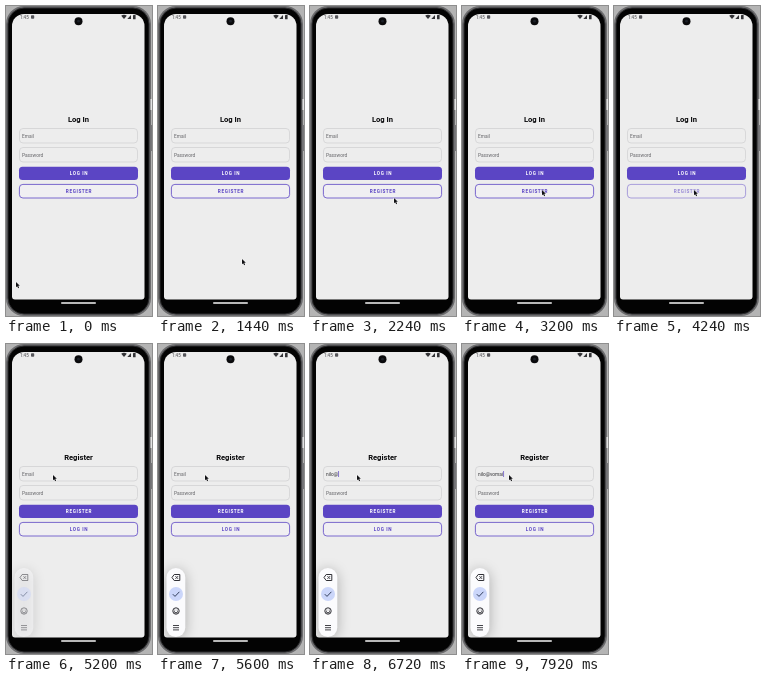
Recreate the animation shown at these times as an HTML page with a canvas. Size 146 px wide and 310 px high, loop 8 s.

```html
<!DOCTYPE html>
<html lang="en">
<head>
<meta charset="utf-8">
<title>Login screen</title>
<style>
html, body { margin: 0; width: 100%; height: 100%; overflow: hidden; background: #000; }
canvas { display: block; width: 146px; height: 310px; }
</style>
</head>
<body>
<canvas id="stage"></canvas>
<script>
const W = 146, H = 310, LOOP = 8000, STEP = 80;
const PURPLE = '#5b45c4', SCREEN = '#ededed', INK = '#111114';
const canvas = document.getElementById('stage');
const ctx = canvas.getContext('2d');
const ratio = window.devicePixelRatio || 1;
canvas.width = W * ratio;
canvas.height = H * ratio;

// Cursor stops: time, x, y
const path = [
  [0, 10, 276], [560, 84, 253], [1440, 84, 253], [1600, 84, 192],
  [2560, 84, 192], [2800, 80, 184], [4240, 80, 184],
  [4560, 53, 138], [4720, 47, 131], [LOOP, 47, 131]
];
const email = 'nilo@vomai';
const keyTimes = [6160, 6240, 6320, 6400, 6640, 6960, 7120, 7280, 7440, 7760];

const clamp = v => Math.max(0, Math.min(1, v));
const ease = v => v * v * (3 - 2 * v);
const ramp = (t, a, b) => ease(clamp((t - a) / (b - a)));

function box(x, y, w, h, r, fill, stroke, line = 1) {
  ctx.beginPath();
  ctx.roundRect(x, y, w, h, r);
  if (fill) { ctx.fillStyle = fill; ctx.fill(); }
  if (stroke) { ctx.strokeStyle = stroke; ctx.lineWidth = line; ctx.stroke(); }
}

function disc(x, y, r, fill) {
  ctx.beginPath();
  ctx.arc(x, y, r, 0, 7);
  ctx.fillStyle = fill;
  ctx.fill();
}

function line(points, color, width = 1, close = false) {
  ctx.beginPath();
  points.forEach(([x, y]) => ctx.lineTo(x, y));
  if (close) ctx.closePath();
  ctx.strokeStyle = color;
  ctx.lineWidth = width;
  ctx.stroke();
}

function text(str, x, y, size, color, weight = 400, align = 'left', spacing = 0) {
  ctx.font = `${weight} ${size}px Roboto, sans-serif`;
  ctx.letterSpacing = spacing + 'px';
  ctx.textAlign = align;
  ctx.fillStyle = color;
  ctx.fillText(str, x, y);
}

function drawPhone() {
  ctx.fillStyle = '#b4b4b4';
  ctx.fillRect(0, 0, W, H);
  box(0, 0, 145, H, 18, '#6c6c6e');
  box(144.5, 93, 1.5, 11, 0, '#e4e4e4');
  box(144.5, 119, 1.5, 26, 0, '#77777a');
  box(2, 2, 141, 306, 16, '#030303', '#2c2c2e', 1);
  box(6, 8, 132.5, 285.5, [12, 12, 3, 3], SCREEN);
  box(55, 296.3, 35, 1.5, 0.75, '#f4f4f4');
  disc(72.5, 15.2, 4, '#0a0a0c');
  disc(72.5, 15.2, 1.4, '#1c2028');
}

function drawStatus() {
  text('1:45', 14, 12.7, 4.5, '#444448');
  box(25, 9.2, 3.2, 3.6, 0.8, '#55555a');
  ctx.fillStyle = '#333336';
  ctx.beginPath();
  ctx.moveTo(118, 13);
  ctx.lineTo(115.2, 9.8);
  ctx.quadraticCurveTo(118, 7.9, 120.8, 9.8);
  ctx.fill();
  ctx.beginPath();
  ctx.moveTo(121.3, 13);
  ctx.lineTo(125, 13);
  ctx.lineTo(125, 9);
  ctx.fill();
  box(127, 9, 2.6, 4.2, 0.5, '#333336');
}

function drawField(y, value, color) {
  box(13.5, y + 0.5, 118, 14.5, 3.5, SCREEN, '#d2d2d4', 0.8);
  text(value, 16, y + 9.5, 4.8, color);
}

function drawForm(t) {
  const registering = t >= 4320;
  const count = keyTimes.filter(k => k <= t).length;
  const typed = email.slice(0, count);
  const names = registering ? ['Register', 'REGISTER', 'LOG IN'] : ['Log In', 'LOG IN', 'REGISTER'];

  text(names[0], 72.5, 116, 7.6, '#08080a', 700, 'center');
  drawField(122, typed || 'Email', typed ? '#303034' : '#626266');
  if (typed) {
    const end = 16 + ctx.measureText(typed).width;
    ctx.fillStyle = PURPLE;
    ctx.fillRect(end + 0.3, 127, 0.7, 6);
  }
  drawField(141, 'Password', '#626266');

  box(13, 160.8, 119, 13.2, 3.5, PURPLE);
  text(names[1], 73, 169.1, 4.7, '#fff', 700, 'center', 0.6);
  ctx.globalAlpha = registering ? 1 : 1 - 0.4 * ramp(t, 3840, 4160);
  box(13.4, 178.4, 118.2, 13.6, 3.5, '#f0eff2', PURPLE, 0.8);
  text(names[2], 73, 186.9, 4.7, PURPLE, 700, 'center', 0.6);
  ctx.globalAlpha = 1;
}

function drawTools(t) {
  const show = ramp(t, 5040, 5360);
  if (!show) return;
  ctx.save();
  ctx.globalAlpha = show;
  ctx.shadowColor = 'rgba(0,0,0,.28)';
  ctx.shadowBlur = 13 * ratio;
  ctx.shadowOffsetY = ratio * 2;
  ctx.save();
  ctx.beginPath();
  ctx.rect(6, 200, 132.5, 93.5);
  ctx.clip();
  box(8.5, 224, 18.8, 69, 9.4, '#fbfbfd');
  ctx.restore();
  ctx.shadowColor = 'transparent';
  disc(18, 250, 7, '#cbd6fa');
  line([[14, 233.5], [16.2, 230.5], [21.8, 230.5], [21.8, 236.5], [16.2, 236.5]], '#303036', 1, true);
  line([[17.3, 232], [20.2, 235]], '#303036', 0.8);
  line([[20.2, 232], [17.3, 235]], '#303036', 0.8);
  line([[14.8, 250.2], [17, 252.4], [21.4, 247.8]], '#34405e', 1);
  ctx.strokeStyle = '#303036';
  ctx.beginPath();
  ctx.arc(18, 267, 3.2, 0, 7);
  ctx.stroke();
  ctx.beginPath();
  ctx.arc(18, 267.3, 1.6, 0, Math.PI);
  ctx.stroke();
  disc(16.8, 266, 0.5, '#303036');
  disc(19.2, 266, 0.5, '#303036');
  for (let i = 0; i < 3; i++) line([[15, 281.5 + i * 2.2], [21, 281.5 + i * 2.2]], '#303036', 0.9);
  ctx.restore();
}

function drawCursor(t) {
  const i = Math.max(1, path.findIndex(p => p[0] > t));
  const [t0, x0, y0] = path[i - 1], [t1, x1, y1] = path[i];
  const k = ramp(t, t0, t1);
  ctx.save();
  ctx.translate(x0 + (x1 - x0) * k, y0 + (y1 - y0) * k);
  ctx.scale(0.88, 0.88);
  ctx.lineJoin = 'round';
  const arrow = [[0, 0], [0, 6], [1.4, 4.8], [2.4, 7], [3.5, 6.5], [2.5, 4.4], [4.4, 4.3]];
  line(arrow, 'rgba(255,255,255,.9)', 1.1, true);
  ctx.fillStyle = INK;
  ctx.fill();
  ctx.restore();
}

function draw(now) {
  const t = Math.floor((now % LOOP) / STEP) * STEP;
  ctx.setTransform(ratio, 0, 0, ratio, 0, 0);
  drawPhone();
  drawStatus();
  drawForm(t);
  drawTools(t);
  drawCursor(t);
}

let start;
function tick(now) {
  start ??= now;
  draw(now - start);
  requestAnimationFrame(tick);
}
draw(0);
requestAnimationFrame(tick);
</script>
</body>
</html>
```
